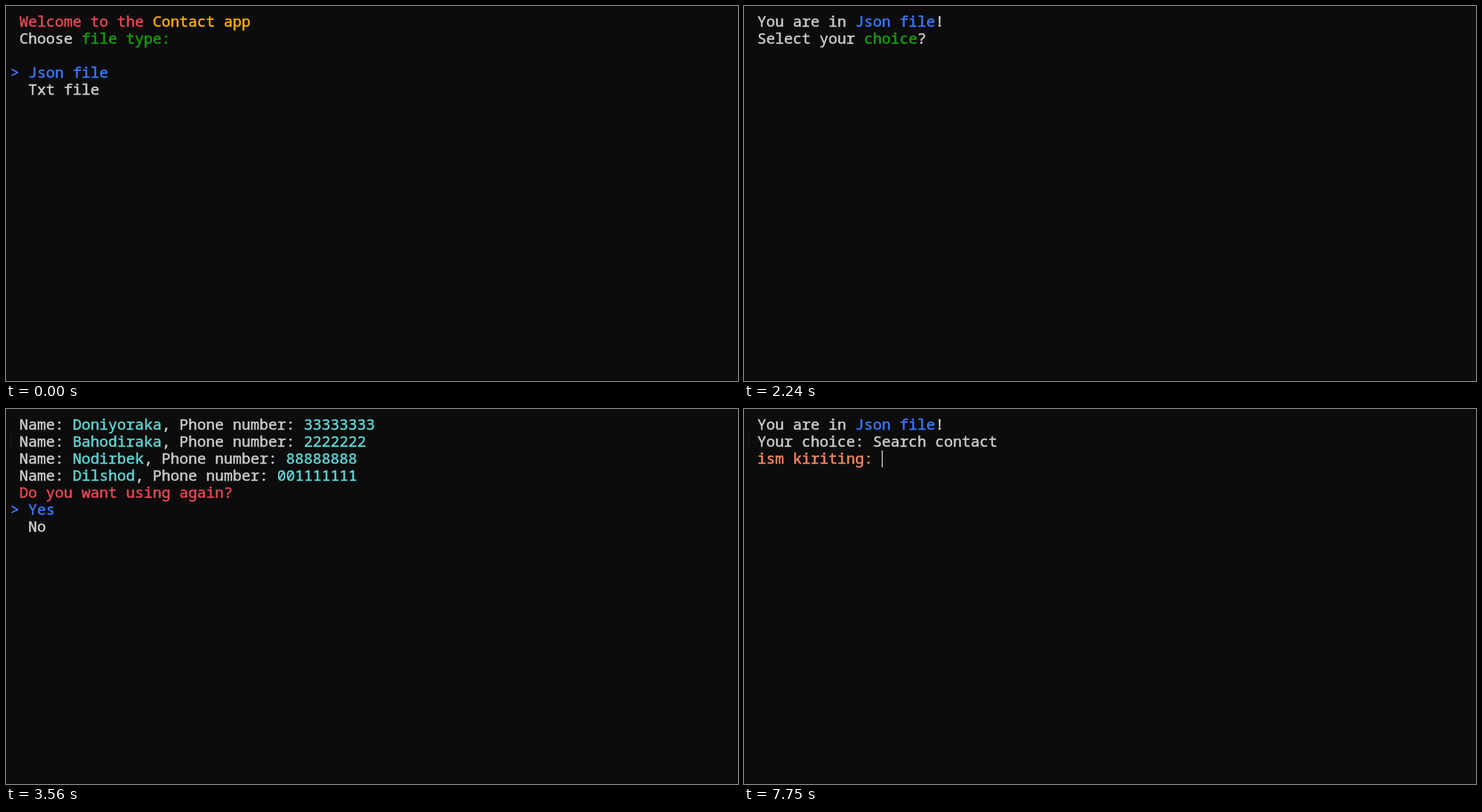
These frames come from a looping animation (988x507 px, 8000 ms). An HTML page:

```html
<!DOCTYPE html>
<html lang="en">
<head>
<meta charset="utf-8">
<title>Contact app</title>
<style>
  html, body { margin: 0; width: 100%; height: 100%; overflow: hidden; background: #0c0c0c; }
  svg { display: block; }
  /* The thin stroke gives the letters a semi-bold weight. */
  text {
    font: 500 20px "Noto Sans Mono", "DejaVu Sans Mono", monospace; white-space: pre;
    color: #ccc; fill: currentColor; stroke: currentColor; stroke-width: 0.5px;
  }
  tspan { fill: currentColor; stroke: currentColor; }
</style>
</head>
<body>
<svg id="stage" width="988" height="507" viewBox="0 0 988 507"></svg>
<script>
const LOOP = 8000, LEFT = 6, TOP = 10, CELL = 12, ROW = 23, BASELINE = 18;
const stage = document.getElementById('stage');

const paint = color => text => `<tspan color="${color}">${text}</tspan>`;
const red = paint('#e74856'), gold = paint('#ffaf00'), green = paint('#13a10e');
const blue = paint('#3b78ff'), cyan = paint('#61d6d6'), coral = paint('#ff875f');

const print = lines => lines.map((line, row) =>
  `<text x="${LEFT}" y="${TOP + row * ROW + BASELINE}">${line}</text>`).join('');
const caret = (col, row, color = '#fff') =>
  `<rect x="${LEFT + col * CELL}" y="${TOP + row * ROW}" width="1" height="${ROW}" fill="${color}"/>`;
const pointer = (x, y) =>
  `<path transform="translate(${x} ${y})" d="M0 0V15.8L3.6 12.4L6.2 18.2L8.6 17.2L6.1 11.4H11Z" fill="#fff"/>`;

const options = (items, selected) =>
  items.map((item, i) => i === selected ? blue('&gt; ' + item) : '  ' + item);
const contact = (name, phone) => ` Name: ${cyan(name)}, Phone number: ${cyan(phone)}`;

const inFile = ` You are in ${blue('Json file')}!`;
const menuHeader = [inFile, ` Select your ${green('choice')}?`, ''];
const actions = ['Read all contacts', 'Search contact', 'Add contact',
  'Remove contact', 'Edit contact', 'Clear all contacts'];
const contacts = [
  contact('Doniyoraka', '33333333'),
  contact('Bahodiraka', '2222222'),
  contact('Nodirbek', '88888888'),
  contact('Dilshod', '001111111'),
];

const welcome = selected => print([
  ` ${red('Welcome to the')} ${gold('Contact app')}`,
  ` Choose ${green('file type:')}`,
  '',
  ...options(['Json file', 'Txt file'], selected),
]);
const menu = selected => print([...menuHeader, ...options(actions, selected)]);
const list = print([...contacts, red(' Do you want using again?'), ...options(['Yes', 'No'], 0)]);
const search = print([inFile, ' Your choice: Search contact', coral(' ism kiriting:')]);

const rest = pointer(558, 253);
const ghost = caret(0, 1, '#191919'); // faint trace left by the caret

// Each scene holds from its start time until the next one.
const scenes = [
  [0, welcome(0)],
  [240, welcome(0) + pointer(884, 490)],
  [310, welcome(0) + pointer(660, 330)],
  [390, welcome(0) + rest],
  [850, welcome(1) + rest],
  [1050, welcome(0) + rest],
  [1380, welcome(1) + rest],
  [1580, welcome(0) + rest],
  [2240, print(menuHeader)],
  [2300, menu(0)],
  [3360, caret(0, 0)],
  [3460, print(contacts.slice(0, 1)) + caret(0, 1)],
  [3560, list + ghost],
  [5350, menu(0) + ghost],
  [6470, menu(1) + ghost],
  [6820, search + ghost + caret(15, 2)],
  [7480, search + ghost],
  [7750, search + ghost + caret(15, 2)],
];

let shown;
function draw() {
  const time = performance.now() % LOOP;
  const scene = scenes.findLast(([start]) => start <= time);
  if (scene !== shown) {
    shown = scene;
    stage.innerHTML = scene[1];
  }
  requestAnimationFrame(draw);
}
draw();
</script>
</body>
</html>
```
